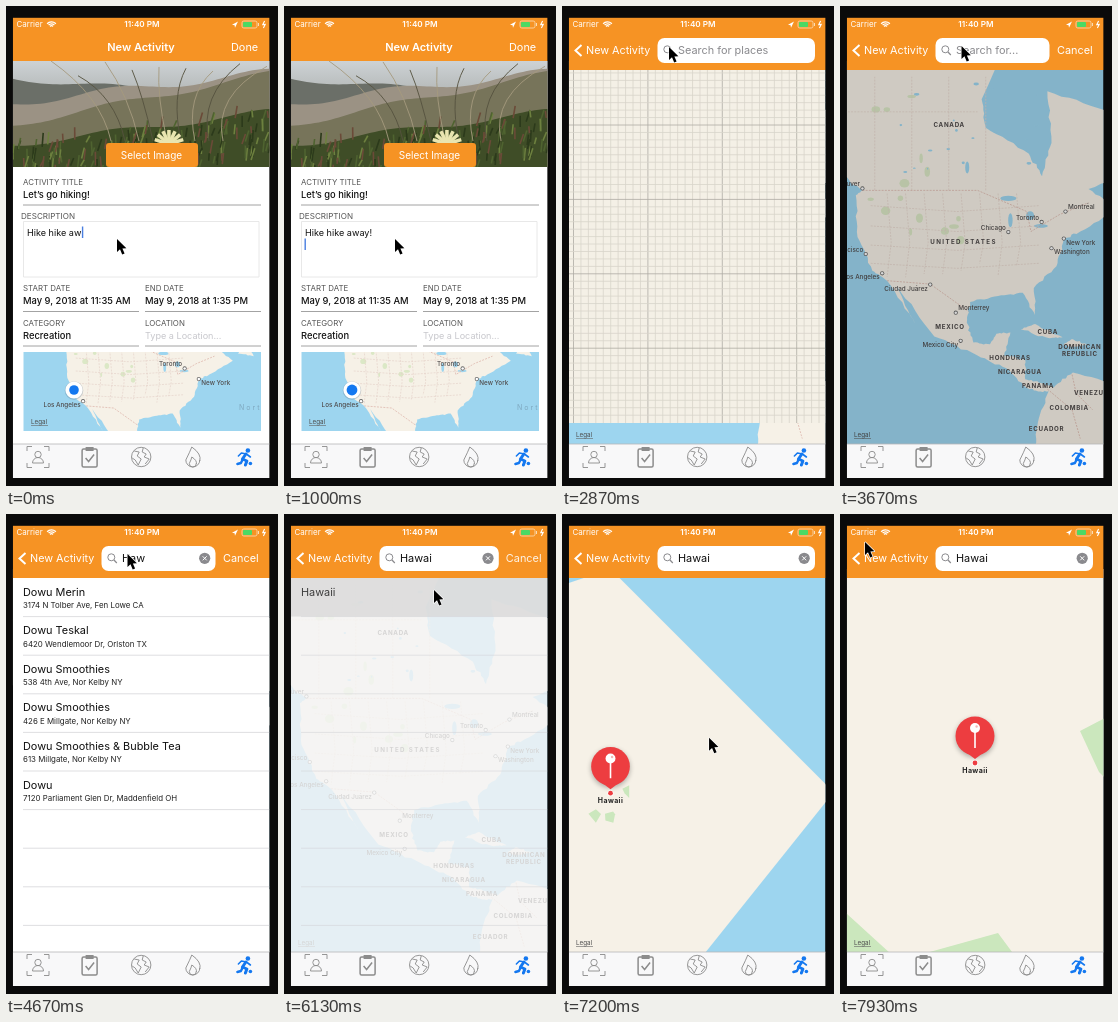
Animation of 272 by 480 pixels, one loop 8000 ms. Source, as an HTML page with a canvas:

```html
<!DOCTYPE html>
<html lang="en">
<head>
<meta charset="utf-8">
<title>New Activity</title>
<style>
html, body { margin: 0; width: 100%; height: 100%; overflow: hidden; background: #0a0a0a; }
canvas { display: block; width: 272px; height: 480px; }
</style>
</head>
<body>
<canvas id="stage"></canvas>
<script>
const canvas = document.getElementById('stage');
const ctx = canvas.getContext('2d');
const dpr = window.devicePixelRatio || 1;
canvas.width = 272 * dpr;
canvas.height = 480 * dpr;

const LOOP = 8000;
const L = 6.8, R = 263.6, W = R - L, TOP = 11.6, BOTTOM = 472, TABS = 438;
const FONT = 'Inter, "Liberation Sans", sans-serif';
const ORANGE = '#f69324', WATER = '#9dd5ef', LAND = '#f6f1e7', BLUE = '#1478f0';
const GRAY = '#8a8a8e', INK = '#111';

const clamp = v => Math.max(0, Math.min(1, v));
const mix = (a, b, p) => a + (b - a) * p;
const span = (t, a, b) => clamp((t - a) / (b - a));
const smooth = p => p * p * (3 - 2 * p);
const easeOut = p => 1 - (1 - p) ** 3;
const cubic = p => p < .5 ? 4 * p ** 3 : 1 - 4 * (1 - p) ** 3;
const rand = n => { const v = Math.sin(n * 12.9898) * 43758.5453; return v - Math.floor(v); };
const times = (n, fn) => { for (let i = 0; i < n; i++) fn(i); };

// ---- Drawing helpers ----
function group(fn, alpha = 1, dx = 0, dy = 0) {
  ctx.save();
  ctx.globalAlpha *= alpha;
  ctx.translate(dx, dy);
  fn();
  ctx.restore();
}
function text(s, x, y, size, color, align = 'left', weight = 400, spacing = 0) {
  ctx.font = `${weight} ${size}px ${FONT}`;
  ctx.letterSpacing = spacing + 'px';
  ctx.textAlign = align;
  ctx.fillStyle = color;
  ctx.fillText(s, x, y);
  ctx.letterSpacing = '0px';
}
function rect(x, y, w, h, color) {
  ctx.fillStyle = color;
  ctx.fillRect(x, y, w, h);
}
function round(x, y, w, h, r, color) {
  ctx.beginPath();
  ctx.roundRect(x, y, w, h, r);
  ctx.fillStyle = color;
  ctx.fill();
}
function oval(x, y, a, b, color) {
  ctx.beginPath();
  ctx.ellipse(x, y, a, b, 0, 0, 7);
  ctx.fillStyle = color;
  ctx.fill();
}
const disc = (x, y, r, color) => oval(x, y, r, r, color);
function stroke(color, width) {
  ctx.strokeStyle = color;
  ctx.lineWidth = width;
  ctx.stroke();
}
function ring(x, y, r, color, width = 1, from = 0, to = 2 * Math.PI) {
  ctx.beginPath();
  ctx.arc(x, y, r, from, to);
  stroke(color, width);
}
function trace(points) {
  ctx.beginPath();
  points.forEach(p => ctx.lineTo(...p));
}
function line(points, color, width = 1) {
  trace(points);
  stroke(color, width);
}
function poly(points, color) {
  trace(points);
  ctx.closePath();
  ctx.fillStyle = color;
  ctx.fill();
}
function curve(x0, y0, cx, cy, x1, y1, color, width) {
  ctx.beginPath();
  ctx.moveTo(x0, y0);
  ctx.quadraticCurveTo(cx, cy, x1, y1);
  stroke(color, width);
}
function clipTo(x, y, w, h) {
  ctx.beginPath();
  ctx.rect(x, y, w, h);
  ctx.clip();
}

// ---- Map: Mercator, longitude and latitude to pixels ----
function project([lon, lat]) {
  const north = Math.asinh(Math.tan(lat * Math.PI / 180));
  return [42 + (lon + 118.24) * 4.11, 267 - 235.6 * (north - .633)];
}
const geo = points => points.map(project);

// Adds small bays and headlands between the key points
function shore(points) {
  const path = new Path2D(), pts = geo(points);
  pts.forEach(([x, y], i) => {
    const [u, v] = pts[(i + 1) % pts.length];
    const bend = Math.min(.07, 1.5 / Math.hypot(u - x, v - y));
    times(8, k => {
      const s = k / 8, w = bend * Math.sin(Math.PI * s) * (rand(i * 8 + k) * 2 - 1);
      path.lineTo(mix(x, u, s) - (v - y) * w, mix(y, v, s) + (u - x) * w);
    });
  });
  path.closePath();
  return path;
}
const shores = [
  // Pacific side southwards, then back up the Atlantic side
  [[-166, 72], [-160, 58], [-150, 60.5], [-137, 58.5], [-128, 51.5], [-123, 49], [-124.6, 48.2],
    [-124.2, 41], [-120.6, 34.5], [-117, 32.5], [-110, 23], [-114.7, 31.5], [-105.5, 20.4],
    [-95, 16], [-88, 13], [-83, 8.3], [-80.2, 7.4], [-77.7, 7.5], [-80.3, 0], [-81, -8],
    [-50, -8], [-60, 8.5], [-71.8, 12], [-76.5, 8.4], [-79.5, 9.5], [-83.4, 10.4], [-83.4, 15],
    [-88.5, 16], [-87, 21.3], [-90.4, 21], [-92, 18.6], [-96, 19], [-97.6, 23.5], [-96.8, 28],
    [-90, 29.3], [-84, 30], [-81, 25.2], [-81.3, 31], [-75.8, 35.4], [-74, 40.6], [-70, 42],
    [-61, 45.8], [-68, 49.2], [-56, 52.5], [-64, 60.2], [-78, 62.4], [-77, 56], [-79.3, 51.2],
    [-82.5, 54.5], [-93, 58], [-94, 61.5], [-82, 72]],
  [[-84.5, 22], [-81, 23.2], [-74.3, 20.2], [-77.5, 20]],
  [[-74.3, 18.4], [-72, 19.8], [-68.4, 18.6], [-71, 18]],
  [[-59, 47.7], [-56, 51.3], [-53, 47]],
].map(shore);

const countries = [['CANADA', -101.9, 58.4], ['UNITED STATES', -98.4, 40.1], ['MEXICO', -101.7, 22.5],
  ['CUBA', -77.9, 21.4], ['HONDURAS', -87.1, 15.4], ['NICARAGUA', -84.7, 12.1], ['PANAMA', -80.3, 8.8],
  ['VENEZUELA', -66.2, 7.1], ['COLOMBIA', -72.7, 3.4], ['ECUADOR', -78.2, -1.7],
  ['DOMINICAN', -70.1, 18], ['REPUBLIC', -70.1, 16.3]];
// Name, place, side of the dot, and whether the label sits above or below
const cities = [['Chicago', -87.5, 41.9, -1, -1], ['Toronto', -79.4, 43.7, -1, -1],
  ['Montréal', -73.6, 45.5, 1, -1], ['New York', -74, 40.7, 1, 1], ['Washington', -77, 38.9, 1, 1],
  ['Los Angeles', -118.2, 34, -1, 1], ['San Francisco', -122.2, 37.8, -1, -1],
  ['Vancouver', -123, 49.3, -1, -1], ['Ciudad Juárez', -106.5, 31.7, -1, 1],
  ['Monterrey', -100.3, 25.7, 1, -1], ['Mexico City', -99.1, 19.4, -1, 1]];
const target = project([-155.5, 19.6]), zoomRate = 6.2;

function borders(z) {
  const tint = '#e6d3ca', strong = '#dcb0a7', w = .7 / z;
  const mark = (points, color = tint) => line(geo(points), color, w);
  ctx.setLineDash([2 / z, 1.2 / z]);
  for (let lon = -117; lon < -82; lon += 4.5) mark([[lon, 48.5], [lon + 1, 40], [lon, 33 + rand(lon) * 3]]);
  for (let lat = 35; lat < 47; lat += 3.5) mark([[-121, lat + 1], [-100, lat], [-80, lat + 1]]);
  for (let lon = -120; lon < -90; lon += 9) mark([[lon, 49], [lon, 64]]);
  mark([[-139, 60], [-95, 60]]);
  mark([[-123, 49], [-95, 49], [-83, 45.5], [-82, 42], [-75, 45], [-68, 47]], strong);
  mark([[-117, 32.5], [-106.5, 31.8], [-97.2, 26]], strong);
  mark([[-78, 8], [-72, 3], [-70, -4]], strong);
  mark([[-72, 11.5], [-71, 7], [-67, 3]], strong);
  ctx.setLineDash([]);
}
function terrain(z, ox, oy) {
  ctx.save();
  ctx.translate(ox, oy);
  ctx.scale(z, z);
  if (z < 60) {
    ctx.fillStyle = LAND;
    shores.forEach(s => ctx.fill(s));
    const spot = (lon, lat, a, b, color) => oval(...project([lon, lat]), a, b, color);
    times(16, i => spot(-121 + rand(i) * 22, 40 + rand(i + 50) * 25, 1 + rand(i + 9) * 4, 1 + rand(i + 7) * 4, '#dbe8c6'));
    times(22, i => spot(-118 + rand(i + 30) * 38, 51 + rand(i + 80) * 15, .6 + rand(i) * 2.2, .5 + rand(i + 3), WATER));
    spot(-87.5, 47.7, 8, 2.6, WATER);
    spot(-87, 44, 2.2, 7, WATER);
    spot(-82.2, 44.8, 4, 4.5, WATER);
    spot(-79.6, 43, 7, 1.8, WATER);
    spot(-97.5, 52.5, 2, 6, WATER);
    borders(z);
  }
  const [x, y] = target;
  ctx.fillStyle = LAND;
  poly([[x - 3, y - 3], [x, y - 4], [x + 4, y], [x, y + 5], [x - 3, y + 3]], LAND);
  times(3, i => oval(x - 5 * (i + 1), y - 4 - 2.5 * i, 1.5 - i * .2, .9, LAND));
  ctx.restore();
}
function cityDot(x, y) {
  disc(x, y, 2.1, '#666');
  disc(x, y, 1.3, '#fff');
}
function city([name, , , side, below], x, y) {
  cityDot(x, y);
  text(name, x + side * 2.5, y + (below > 0 ? 6 : -2.3), 6.3, '#4f4b4b', side < 0 ? 'right' : 'left', 500);
}
function legal(x, y) {
  text('Legal', x, y, 6.3, '#4c4c4c');
  line([[x, y + 1.5], [x + 17, y + 1.5]], '#666', .6);
}
function bigMap(t) {
  const e = cubic(span(t, 6515, 7750));
  const z = Math.exp(zoomRate * e);
  const px = mix(target[0], 135, e), py = mix(target[1], 248, e);
  const ox = px - target[0] * z, oy = py - target[1] * z;
  const at = place => { const [x, y] = project(place); return [ox + x * z, oy + y * z]; };
  rect(L, 64, W, TABS - 64, WATER);
  terrain(z, ox, oy);

  const near = z / Math.exp(zoomRate);
  if (near > .04) {
    ctx.save();
    ctx.translate(px, py);
    ctx.scale(near, near);
    const green = '#cbe7bd';
    poly([[105, -31], [165, -62], [165, 52], [124, 10]], green);
    poly([[-129, 151], [-84, 192], [-129, 270], [-195, 190]], green);
    poly([[-49, 191], [23, 171], [40, 194], [25, 270], [-45, 250]], green);
    ctx.restore();
  }
  const grid = 1 - span(t, 2950, 3250);
  group(() => {
    cities.forEach(c => city(c, ...at(c.slice(1, 3))));
    countries.forEach(([name, ...place]) => {
      const [x, y] = at(place);
      text(name, x, y + 2.3, 6.2, '#4d4848', 'center', 700, name.includes(' ') ? 1.4 : .7);
    });
  }, clamp(2.5 - z) * (1 - grid));

  const pop = easeOut(span(t, 7000, 7250));
  if (pop) pin(px, py, pop);
  legal(14, 431);
  if (grid) group(drawGrid, grid);
}
function drawGrid() {
  const step = 7.44, tint = i => i % 10 ? '#d9d5cb' : '#aeaba4';
  ctx.save();
  clipTo(L, 64, W, 353);
  rect(L, 64, W, 353, '#f4f0e6');
  times(35, i => line([[11.5 + i * step, 64], [11.5 + i * step, 417]], tint(i), .8));
  times(50, i => line([[L, 44.6 + i * step], [R, 44.6 + i * step]], tint(i), .8));
  ctx.restore();
}
function pin(x, y, s) {
  const red = '#ed3d40';
  ctx.save();
  ctx.translate(x, y);
  ctx.scale(s, s);
  ctx.shadowColor = 'rgba(0,0,0,.3)';
  ctx.shadowBlur = 5 * dpr;
  ctx.shadowOffsetY = 2 * dpr;
  disc(0, -26, 19.5, red);
  ctx.shadowColor = 'transparent';
  poly([[-8, -9], [0, -3], [8, -9]], red);
  disc(0, 1, 3, '#fff');
  disc(0, 1, 2.4, red);
  line([[0, -30], [0, -14]], '#fff', 1.6);
  disc(0, -34, 5, '#fff');
  disc(1.6, -35.5, 1.2, '#f3b5b5');
  text('Hawaii', 0, 11, 7, '#222', 'center', 700, .4);
  ctx.restore();
}

// ---- Form ----
function photo() {
  ctx.save();
  clipTo(L, 55, W, 106);
  const sky = ctx.createLinearGradient(0, 55, 0, 161);
  sky.addColorStop(0, '#cdd2d5');
  sky.addColorStop(.3, '#b4b8b7');
  sky.addColorStop(1, '#8b8576');
  rect(L, 55, W, 106, sky);
  const hill = (base, slope, wave, color) => {
    ctx.beginPath();
    ctx.moveTo(L, 161);
    for (let x = L; x < R + 4; x += 4) ctx.lineTo(x, base + slope * (x - L) + wave * Math.sin(x / 23));
    ctx.lineTo(R + 4, 161);
    ctx.fillStyle = color;
    ctx.fill();
  };
  hill(72, .09, 3, '#6b6f68');
  hill(97, -.12, 4, '#9b9284');
  hill(119, -.2, 3, '#77745a');
  hill(139, -.13, 3, '#3f4d27');
  times(200, i => {
    const x = L + rand(i) * W, y = 142 - .13 * x + rand(i + 400) * 45, h = 6 + rand(i + 70) * 8;
    line([[x, y], [x + rand(i + 5) * 5 - 1, y - h]], ['#6d803f', '#2c3a1b', '#4f6330', '#6b4a38'][i % 4], 1.6);
  });
  times(9, i => curve(105 + i * 14, 135, 95 + i * 14, 90, 45 + i * 27, 55 + rand(i) * 16, i % 2 ? '#55523f' : '#a59a7e', .9));
  times(7, i => {
    const a = Math.PI * (1.1 + i * .133);
    line([[163, 138], [163 + 15 * Math.cos(a), 138 + 14 * Math.sin(a)]], '#e9e5b0', 3.5);
  });
  ctx.restore();
  round(100, 137, 92, 24, 3, ORANGE);
  text('Select Image', 145.5, 152.6, 10, '#fff', 'center');
}
function miniMap(t) {
  const z = .637, ox = 50.2, oy = 224.9;
  ctx.save();
  clipTo(17.5, 346, 237.5, 79);
  rect(17, 346, 239, 79, WATER);
  terrain(z, ox, oy);
  text('North', 233, 404, 7, '#7fa9c0', 'left', 400, 2);
  cities.filter(c => /Tor|New|Los/.test(c[0])).forEach(c => {
    const [x, y] = project(c.slice(1, 3));
    city(c, ox + x * z, oy + y * z);
  });
  legal(25, 418);
  disc(68, 384.5, 9.3, 'rgba(60,90,120,.25)');
  disc(68, 384, 8.6, '#fff');
  disc(68, 384, 5.4 - .6 * Math.cos(t * Math.PI / 2000), BLUE);
  ctx.restore();
}
function form(t) {
  const label = '#555', rule = '#8c8c8c';
  rect(L, 55, W, 383, '#fff');
  photo();
  text('ACTIVITY TITLE', 17, 178.6, 7.9, label);
  text('Let’s go hiking!', 17, 192, 9.3, INK, 'left', 500);
  line([[17, 199], [255, 199]], rule, .8);
  text('DESCRIPTION', 15, 213, 8.1, label);
  ctx.beginPath();
  ctx.rect(17.5, 215.5, 235.5, 55.5);
  stroke('#e2e2e2', .8);

  const typed = [130, 270, 540].filter(k => t >= k).length;
  const note = 'Hike hike away!'.slice(0, 12 + typed), wrapped = t >= 800;
  text(note, 21, 230, 9.1, INK);
  const caret = wrapped ? 20.5 : 21.5 + ctx.measureText(note).width;
  rect(caret, wrapped ? 232.5 : 220.5, 1.4, 11.5, '#4a7fe0');

  const field = (name, value, x, y, hint) => {
    text(name, x, y, 7.9, label);
    text(value, x, y + 13.3, hint ? 9.1 : 9.4, hint ? '#c7c7cc' : INK, 'left', hint ? 400 : 500);
    line([[x, y + 20.5], [x < 100 ? 133 : 255, y + 20.5]], rule, .8);
  };
  field('START DATE', 'May 9, 2018 at 11:35 AM', 17, 285);
  field('END DATE', 'May 9, 2018 at 1:35 PM', 139, 285);
  field('CATEGORY', 'Recreation', 17, 319.5);
  field('LOCATION', 'Type a Location...', 139, 319.5, true);
  miniMap(t);
}

// ---- Search ----
const results = [['Dowu Merin', '3174 N Tolber Ave, Fen Lowe CA'],
  ['Dowu Teskal', '6420 Wendlemoor Dr, Orlston TX'],
  ['Dowu Smoothies', '538 4th Ave, Nor Kelby NY'],
  ['Dowu Smoothies', '426 E Millgate, Nor Kelby NY'],
  ['Dowu Smoothies & Bubble Tea', '613 Millgate, Nor Kelby NY'],
  ['Dowu', '7120 Parliament Glen Dr, Maddenfield OH']];

function list(t) {
  const pitch = 38.6;
  rect(L, 64, W, TABS - 64, '#fff');
  if (t > 6000) rect(L, 64, W, pitch, '#d9d9d9');
  const rows = t < 4270 ? [] : t < 5270 ? results : [['Hawaii', '']];
  times(9, i => {
    const y = 64 + (i + 1) * pitch;
    line([[17, y], [R, y]], '#d2d1d5', .7);
  });
  rows.forEach(([name, place], i) => {
    text(name, 17, 81.5 + i * pitch, 10.9, INK);
    text(place, 17, 94 + i * pitch, 7.9, '#222');
  });
}
const focus = t => smooth(span(t, 3050, 3350)) * (1 - smooth(span(t, 6070, 6350)));

function search(t) {
  bigMap(t);
  rect(L, 64, W, TABS - 64, `rgba(0,0,0,${.16 * focus(t)})`);
  if (t > 3930 && t < 6350) group(() => list(t), 1 - span(t, 6070, 6350));
}
function searchBar(t) {
  const f = focus(t), right = mix(253, 209.5, f);
  line([[19.5, 39], [13.5, 44.5], [19.5, 50]], '#fff', 2);
  text('New Activity', 24, 48.4, 10.8, '#fff');
  group(() => text('Cancel', 217, 48.4, 10.9, '#fff'), f, 40 * (1 - f));
  round(95.5, 32, right - 95.5, 25, 7, '#fff');
  ring(105.3, 43.3, 3.5, GRAY);
  line([[108, 46], [110.8, 49]], GRAY, 1.2);
  const size = t < 3870 ? 0 : t < 4000 ? 1 : t < 4270 ? 2 : t < 5130 ? 3 : 5;
  if (size) {
    text('Hawaii'.slice(0, size), 116, 48.4, 10.9, INK);
    const x = right - 10.8, y = 44.3;
    disc(x, y, 5.6, GRAY);
    [-2, 2].forEach(d => line([[x - d, y - 2], [x + d, y + 2]], '#fff'));
  } else text(f > .5 ? 'Search for...' : 'Search for places', 116, 48.4, 10.9, GRAY);
}

// ---- Chrome ----
function statusBar() {
  text('Carrier', 10.5, 21.4, 8, '#fff');
  [2, 4, 6].forEach(r => ring(45.5, 21.8, r, '#fff', 1.3, -Math.PI * .76, -Math.PI * .24));
  text('11:40 PM', 136, 21.4, 8.2, '#fff', 'center', 600);
  poly([[226, 18.8], [232, 15.5], [229, 21.8], [228.6, 19.2]], '#fff');
  ctx.beginPath();
  ctx.roundRect(236, 15, 15, 7, 1.8);
  stroke('#fbdcb4', .8);
  round(237, 16, 9, 5, 1, '#4cd964');
  rect(252, 17, 1, 3, '#fbdcb4');
  line([[258.6, 15], [256.8, 18.6], [259.2, 18.4], [257.4, 22]], '#fff', 1.1);
}
const icons = [
  c => {
    [-1, 1].forEach(a => [-1, 1].forEach(b => line([[11 * a, 6 * b], [11 * a, 10.5 * b], [6 * a, 10.5 * b]], c, .9)));
    ring(0, -2.5, 3.2, c, .9);
    ring(0, 6, 5.5, c, .9, Math.PI, 0);
    line([[-5.5, 6], [5.5, 6]], c, .9);
  },
  c => {
    ctx.beginPath();
    ctx.roundRect(-7.5, -8, 15, 18, 1.5);
    stroke(c, 1.5);
    rect(-4, -10, 8, 4, c);
    line([[-4, 1], [-1, 4.5], [4.5, -2.5]], c, 1.5);
  },
  c => {
    ring(0, 0, 9.7, c, .9);
    line([[-7, -6], [-2, -5], [-4, -1], [0, 2], [-3, 8], [-6, 3], [-9, 1]], c, .9);
    line([[2, -9], [1, -5], [5, -3], [3, 0], [8, 2], [4, 7]], c, .9);
  },
  c => {
    [1, .5].forEach(s => {
      const y = 10 - 10 * s;
      curve(-1, y - 10 * s, 9 * s, y - 3 * s, 7 * s, y + 4 * s, c, .9);
      curve(-1, y - 10 * s, -3 * s, y - 5 * s, -7 * s, y + 3 * s, c, .9);
      ring(0, y + 3 * s, 7 * s, c, .9, 0, Math.PI);
    });
  },
  () => {
    ctx.lineCap = ctx.lineJoin = 'round';
    disc(3.5, -6.5, 2.3, BLUE);
    line([[1.5, -3], [-2, 2], [2.5, 4], [1, 8]], BLUE, 3);
    line([[-2, 3], [-3.5, 6], [-7, 7]], BLUE, 2.4);
    line([[-6, -1], [-3, -4], [2, -3], [6, 0]], BLUE, 1.6);
    disc(6, 6.5, 1.8, BLUE);
  }];
function tabBar() {
  rect(L, TABS, W, BOTTOM - TABS, '#f8f8f9');
  line([[L, TABS], [R, TABS]], '#b5b5b7', .8);
  icons.forEach((icon, i) => group(() => icon('#8c8c8c'), 1, 32 + i * 51.6, 451));
}
// Start, end, and where the pointer comes to rest
const moves = [[1000, 1850, 201, 331], [2250, 2750, 107, 41], [3050, 3400, 121.5, 40],
  [5680, 5930, 150, 76], [6150, 6600, 172.5, 264.5], [6950, 7900, 25, 28]];
function pointer(t) {
  const [x, y] = moves.reduce(([px, py], [a, b, nx, ny]) => {
    const p = smooth(span(t, a, b));
    return [mix(px, nx, p), mix(py, ny, p)];
  }, [111, 233]);
  const arrow = [[0, 0], [0, 13], [3, 10.3], [5.2, 15.5], [7.6, 14.5], [5.4, 9.5], [9.4, 9.3]];
  group(() => {
    ctx.lineJoin = 'round';
    line([...arrow, arrow[0]], '#fff', 1.3);
    poly(arrow, '#000');
  }, 1, x, y);
}

function draw(t) {
  ctx.setTransform(dpr, 0, 0, dpr, 0, 0);
  rect(0, 0, 272, 480, '#0a0a0a');
  const push = easeOut(span(t, 2200, 2650));
  ctx.save();
  clipTo(L, TOP, W, BOTTOM - TOP);
  if (push < 1) group(() => form(t), 1, -.3 * W * push);
  if (push > 0) group(() => {
    clipTo(L, 55, W, TABS - 55);
    search(t);
  }, 1, W * (1 - push));
  rect(L, TOP, W, mix(55, 64, push) - TOP, ORANGE);
  group(() => {
    text('New Activity', 135, 44.5, 11, '#fff', 'center', 600);
    text('Done', 225, 44.5, 10.9, '#fff');
  }, 1 - push, -80 * push);
  group(() => searchBar(t), push, 100 * (1 - push));
  statusBar();
  tabBar();
  ctx.restore();
  pointer(t);
}
function tick(now) {
  draw(now % LOOP);
  requestAnimationFrame(tick);
}
requestAnimationFrame(tick);
</script>
</body>
</html>
```
